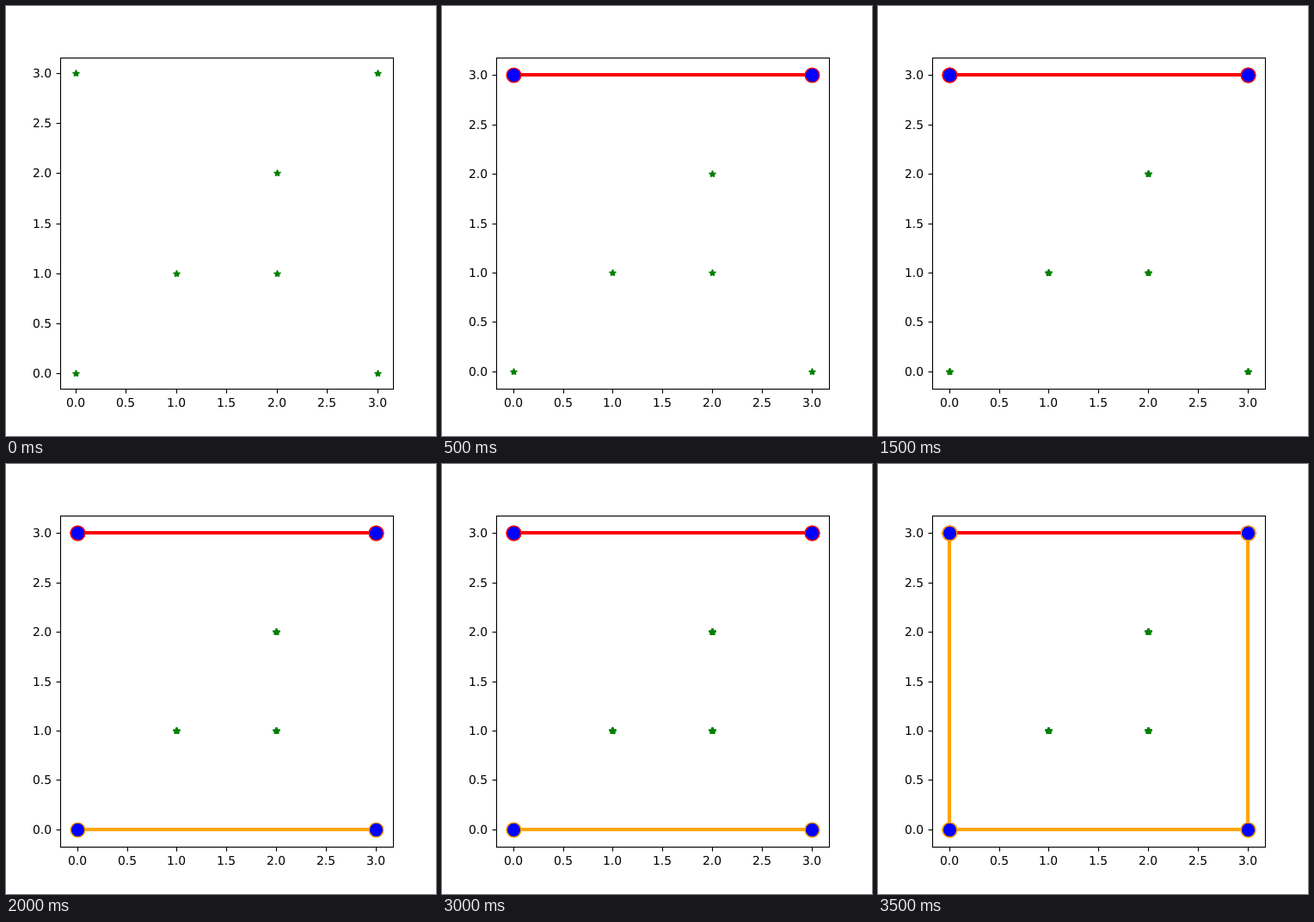
Recreate the animation shown at these times as an HTML page. Size 500 by 500 pixels, loop 4 s.

```html
<!DOCTYPE html>
<html lang="en">
<head>
<meta charset="utf-8">
<title>Hull steps</title>
<style>
  html, body { margin: 0; width: 100%; height: 100%; overflow: hidden; background: #fff; }
  svg { display: block; width: 500px; height: 500px; }
  text { font: 13.89px "DejaVu Sans", sans-serif; text-rendering: geometricPrecision; }
</style>
</head>
<body>
<svg id="plot" viewBox="0 0 500 500"></svg>
<script>
const STEP = 500, COUNT = 8;
const plot = document.getElementById('plot');
const points = [[0, 0], [3, 0], [0, 3], [3, 3], [1, 1], [2, 1], [2, 2]];

// Each entry: step it appears in, colour, start point, end point
const edges = [
  [1, 'red', [0, 3], [3, 3]],
  [2, 'red', [0, 3], [0, 3]],
  [3, 'red', [3, 3], [3, 3]],
  [4, 'orange', [0, 0], [3, 0]],
  [5, 'orange', [0, 0], [0, 0]],
  [6, 'orange', [3, 0], [3, 0]],
  [7, 'orange', [0, 0], [0, 3]],
  [7, 'orange', [3, 0], [3, 3]]
];

const same = (a, b) => a[0] === b[0] && a[1] === b[1];
const line = (x1, y1, x2, y2, color, width) =>
  `<line x1="${x1}" y1="${y1}" x2="${x2}" y2="${y2}" stroke="${color}" stroke-width="${width}"/>`;

function render(step) {
  // The axis range widens once the first edge is drawn
  const range = step ? 3.35 : 3.31;
  const px = v => Math.round(256.25 + (v - 1.5) * 387.5 / range);
  const py = v => Math.round(252.5 - (v - 1.5) * 385 / range);

  const star = ([x, y]) =>
    `<path transform="translate(${px(x) + 0.5} ${py(y) + 0.5})"
      d="M0-4 1-1H4L2 0V3L0 2-2 3V0L-4-1H-1Z"
      fill="green" stroke="green" stroke-width="1.39" stroke-linejoin="bevel"/>`;
  const dot = ([x, y], color) =>
    `<circle cx="${px(x) + 0.5}" cy="${py(y) + 0.5}" r="8.33"
      fill="blue" stroke="${color}" stroke-width="1.39"/>`;
  const edge = ([, color, a, b]) =>
    (same(a, b) ? '' : line(px(a[0]), py(a[1]), px(b[0]), py(b[1]), color, 4.17)) +
    dot(a, color) + (same(a, b) ? '' : dot(b, color));

  const shown = edges.filter(e => e[0] <= step);
  const loose = points.filter(p => !shown.some(e => same(p, e[2]) || same(p, e[3])));
  let out = '';

  // Stars are painted again on every step, which hardens their edges
  for (let i = 0; i < Math.max(1, step); i++) out += loose.map(star).join('');
  out += shown.map(edge).join('');

  for (let v = 0; v <= 3; v += 0.5) {
    const x = px(v), y = py(v), label = v.toFixed(1);
    out += line(x + 0.5, 445.5, x + 0.5, 450.5, '#000', 1.11);
    out += line(58.5, y + 0.5, 63.5, y + 0.5, '#000', 1.11);
    out += `<text x="${x}" y="466" text-anchor="middle">${label}</text>`;
    out += `<text x="53" y="${y + 5}" text-anchor="end">${label}</text>`;
  }
  out += '<rect x="63.5" y="60.5" width="387" height="385" fill="none" stroke="#000" stroke-width="1.11"/>';
  plot.innerHTML = out;
}

let current = -1;
const start = performance.now();

function tick(now) {
  const step = Math.floor(Math.max(0, now - start) / STEP) % COUNT;
  if (step !== current) render(current = step);
  requestAnimationFrame(tick);
}
tick(start);
</script>
</body>
</html>
```
